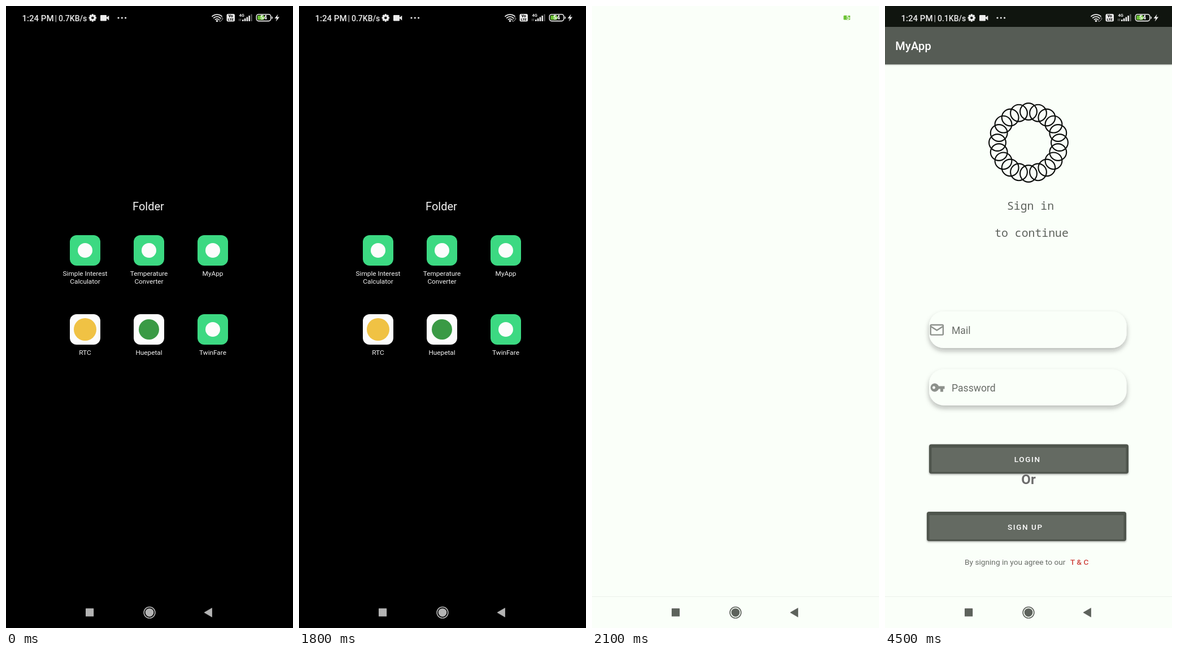
Write an HTML page that moves like this. It is 508 by 1102 pixels and loops after 5000 ms.

```html
<!DOCTYPE html>
<html lang="en">
<head>
<meta charset="utf-8">
<title>App launch</title>
<style>
  html, body { margin: 0; width: 100%; height: 100%; overflow: hidden; background: #000; }
  svg { display: block; width: 100vw; height: 100vh; }
  text { font-family: Roboto, "Noto Sans", sans-serif; white-space: pre; }
  .mono { font-family: "Noto Sans Mono", "DejaVu Sans Mono", monospace; }
</style>
</head>
<body>
<svg id="stage" viewBox="0 0 508 1102" xmlns="http://www.w3.org/2000/svg"></svg>
<script>
const LOOP = 5000, STEP = 100;
const OPENING = 1900, NEARLY_OPEN = 2000, OPEN = 2100, LOADED = 3000, SIGNAL_BACK = 4500;
const PAPER = '#fafff9', INK = '#5d625c', CENTER = { x: 254, y: 551 };

const rect = (x, y, w, h, fill, rx = 0, more = '') =>
  `<rect x="${x}" y="${y}" width="${w}" height="${h}" rx="${rx}" fill="${fill}" ${more}/>`;
const circle = (x, y, r, fill, more = '') =>
  `<circle cx="${x}" cy="${y}" r="${r}" fill="${fill}" ${more}/>`;
const path = (d, more = '') => `<path d="${d}" ${more}/>`;
const text = (x, y, size, fill, content, more = '') =>
  `<text x="${x}" y="${y}" font-size="${size}" fill="${fill}" ${more}>${content}</text>`;
const centered = 'text-anchor="middle"';
const range = n => [...Array(n).keys()];

function launcherIcon(x, y, tile, dot, radius, lines) {
  return rect(x - 27, y - 27, 54, 54, tile, 12) + circle(x, y, radius, dot) +
    lines.map((line, i) => text(x, y + 44.5 + i * 14, 11.8, '#f4f4f4', line, centered)).join('');
}

function home() {
  const green = '#3cd982', white = '#fcfcfc';
  return text(252, 362, 20, '#f4f4f4', 'Folder', centered) +
    launcherIcon(140, 433, green, white, 13, ['Simple Interest', 'Calculator']) +
    launcherIcon(253, 433, green, white, 13, ['Temperature', 'Converter']) +
    launcherIcon(366, 433, green, white, 13, ['MyApp']) +
    launcherIcon(140, 573, white, '#f0c244', 20, ['RTC']) +
    launcherIcon(253, 573, white, '#3a9a45', 18, ['Huepetal']) +
    launcherIcon(366, 573, green, white, 13, ['TwinFare']);
}

function gear(x, y) {
  const teeth = range(8).map(i =>
    `<rect x="${x - 1.7}" y="${y - 6.7}" width="3.4" height="4" rx=".6" transform="rotate(${i * 45} ${x} ${y})"/>`).join('');
  return teeth + circle(x, y, 3.7, 'none', 'stroke="currentColor" stroke-width="2.8"');
}

function wifi(x, y) {
  const arc = r => {
    const d = r * 0.72;
    return path(`M${x - d} ${y - d}A${r} ${r} 0 0 1 ${x + d} ${y - d}`,
      'fill="none" stroke="currentColor" stroke-width="1.8"');
  };
  return [5, 8.8, 12.6].map(arc).join('') + circle(x, y - 1.5, 1.8, 'currentColor') +
    `<g transform="rotate(-45 380.5 24)">${rect(376.5, 22.6, 8, 3, '#000', 1.5, 'stroke="currentColor" stroke-opacity=".65"')}</g>`;
}

function statusBar() {
  const bars = range(5).map(i => {
    const h = [3, 5, 7.5, 10, 12.5][i];
    return rect(418 + i * 3.8, 27 - h, 2.6, h, 'currentColor', .4,
      `${i === 3 ? 'id="bar"' : ''} opacity="${i === 4 ? .35 : 1}"`);
  }).join('');
  return `<g id="icons" color="#ececec" fill="currentColor">` +
    text(28.5, 27, 15, 'currentColor', '1:24 PM', 'font-weight="500"') +
    text(86.5, 26.5, 14, 'currentColor', '|') +
    text(93, 26.8, 14, 'currentColor', '', 'id="speed" font-weight="500"') +
    gear(153.3, 21) +
    rect(167, 16, 11, 10.5, 'currentColor', 1.3) + path('M177 21L182.3 17V25.5Z') +
    [199, 205.3, 211.6].map(x => circle(x, 21, 1.6, 'currentColor')).join('') +
    wifi(373.5, 28) +
    rect(390.5, 14, 14.5, 13.5, 'currentColor', 2.5) +
    text(397.7, 20.3, 6.5, '#111', 'Vo', centered + ' font-weight="800"') +
    text(397.7, 26.2, 6, '#111', 'LTE', centered + ' font-weight="800"') +
    text(412.5, 19, 7.5, 'currentColor', '4G', 'font-weight="700"') +
    path('M412.8 26.5v-4M415.3 22.5v4', 'stroke="currentColor" opacity=".6"') + bars +
    rect(443.3, 14.8, 25.4, 11.8, 'none', 3.8, 'stroke="currentColor" stroke-width="1.6"') +
    path('M470.3 18.3q1.8 .3 1.8 2.4t-1.8 2.4Z') +
    path('M481.5 14.5L475.5 22H479.2L477.7 27.5L484 19.5H480Z') + '</g>' +
    rect(445.3, 16.8, 11.7, 7.8, '#6cc335', 1.3) +
    text(456, 24.4, 10.5, '#fff', '54', centered + ' id="charge" font-weight="700"');
}

function navBar() {
  return `<g id="nav" color="#b4b4b4" fill="currentColor">` +
    rect(141, 1067.3, 14.2, 14.2, 'currentColor', .6) +
    circle(254, 1074.6, 7.4, 'currentColor') +
    circle(254, 1074.6, 9.9, 'none', 'stroke="currentColor" stroke-width="1.6"') +
    path('M351 1074.6L364.5 1066.7V1082.5Z', 'stroke="currentColor" stroke-width=".8" stroke-linejoin="round"') + '</g>';
}

const field = (y, h, label) =>
  rect(78, y, 349.5, h, PAPER, 26, 'filter="url(#fieldShadow)"') +
  text(118, y + 39.7, 17.6, '#686c67', label);

const button = (x, y, labelX, label) =>
  rect(x, y, 353, 52, '#50554e', 4, 'filter="url(#buttonShadow)"') +
  rect(x + 4.5, y + 6, 344, 43, '#646a62', 1) +
  text(labelX, y + 31.6, 13.5, '#fff', label, 'font-weight="500" letter-spacing="1.6"');

function signIn() {
  const ring = range(20).map(i => {
    const a = i * Math.PI / 10;
    return circle(254 + 55 * Math.sin(a), 242 - 55 * Math.cos(a), 14.9, 'none');
  }).join('');
  return rect(0, 0, 508, 37, '#10150f') +
    rect(0, 37, 508, 66.5, '#575c55', 0, 'filter="url(#barShadow)"') +
    rect(0, 0, 508, 37, '#10150f') +
    text(18.2, 78, 20, '#fff', 'MyApp', 'font-weight="500" letter-spacing=".25"') +
    `<g stroke="#0b0d0b" stroke-width="2.1">${ring}</g>` +
    text(257.5, 361, 19.8, INK, 'Sign in', centered + ' class="mono" font-weight="500"') +
    text(259.5, 408.5, 19.8, INK, 'to continue', centered + ' class="mono" font-weight="500"') +
    field(541, 65, 'Mail') + field(643.5, 64, 'Password') +
    rect(80.7, 565, 22.2, 17.6, 'none', 1.5, 'stroke="#8d918c" stroke-width="2.4"') +
    path('M81.5 568L91.8 574.5L102 568', 'fill="none" stroke="#8d918c" stroke-width="2.4"') +
    path('M95 673.5H105.5V678.5H103V683.5H98V678.5H95A7.4 7.4 0 1 1 95 673.5ZM86.5 673.5a2.5 2.5 0 1 0 .01 0Z',
      'fill="#8d918c" fill-rule="evenodd"') +
    button(78, 776.5, 228.8, 'LOGIN') +
    text(254, 847, 24, '#6b6b6b', 'Or', centered + ' font-weight="700"') +
    button(74, 896, 217, 'SIGN UP') +
    text(141, 989.6, 13.7, '#686c67', 'By signing in you agree to our') +
    text(328, 989.6, 13.7, '#cf4640', 'T &amp; C', 'font-weight="500"');
}

const shadow = (id, dy, blur, alpha) =>
  `<filter id="${id}" x="-10%" y="-30%" width="120%" height="190%"><feDropShadow dx="0" dy="${dy}" stdDeviation="${blur}" flood-color="#222" flood-opacity="${alpha}"/></filter>`;

const stage = document.getElementById('stage');
stage.innerHTML =
  `<defs>${shadow('fieldShadow', 5, 4.5, .3)}${shadow('buttonShadow', 1.5, 1.5, .4)}${shadow('barShadow', 1, 1, .25)}</defs>` +
  rect(0, 0, 508, 1102, '#000') +
  `<g id="home">${home()}</g>` +
  rect(0, 0, 0, 0, PAPER, 0, 'id="window"') +
  `<g id="app">${signIn()}</g>` +
  rect(0, 1046, 508, 1, '#ebf0ea', 0, 'id="divider"') +
  statusBar() + navBar();

const part = Object.fromEntries([...stage.querySelectorAll('[id]')].map(el => [el.id, el]));
const set = (el, attrs) => Object.entries(attrs).forEach(([k, v]) => el.setAttribute(k, v));
const show = (el, on) => set(el, { display: on ? 'inline' : 'none' });

function windowBox(t) {
  if (t < OPENING) return [0, 0, 0, 0];
  if (t < NEARLY_OPEN) return [145.5, 249, 299.5, 521.5];
  if (t < OPEN) return [1, 2, 506, 1098];
  return [0, 0, 508, 1102];
}

function draw(time) {
  const t = Math.floor(time % LOOP / STEP) * STEP;
  const opening = t >= OPENING, covered = t >= NEARLY_OPEN, loaded = t >= LOADED;
  const [x, y, width, height] = windowBox(t);
  set(part.window, { x, y, width, height });

  const scale = opening ? 0.871 : 1;
  set(part.home, {
    transform: `translate(${CENTER.x} ${CENTER.y}) scale(${scale}) translate(${-CENTER.x} ${-CENTER.y})`,
    opacity: opening ? 0.5 : 1
  });
  show(part.home, !covered);
  show(part.app, loaded);
  show(part.divider, t >= OPEN);

  // White status icons vanish against the blank window; only the charge level stays.
  show(part.icons, !covered || loaded);
  part.speed.textContent = loaded ? '0.1KB/s' : '0.7KB/s';
  set(part.bar, { opacity: loaded && t < SIGNAL_BACK ? 0.35 : 1 });
  set(part.charge, { fill: covered && !loaded ? PAPER : '#fff' });
  set(part.nav, { color: covered ? INK : opening ? '#686868' : '#b4b4b4' });
}

const start = performance.now();
function tick() {
  draw(performance.now() - start);
  requestAnimationFrame(tick);
}
draw(0);
requestAnimationFrame(tick);
</script>
</body>
</html>
```
